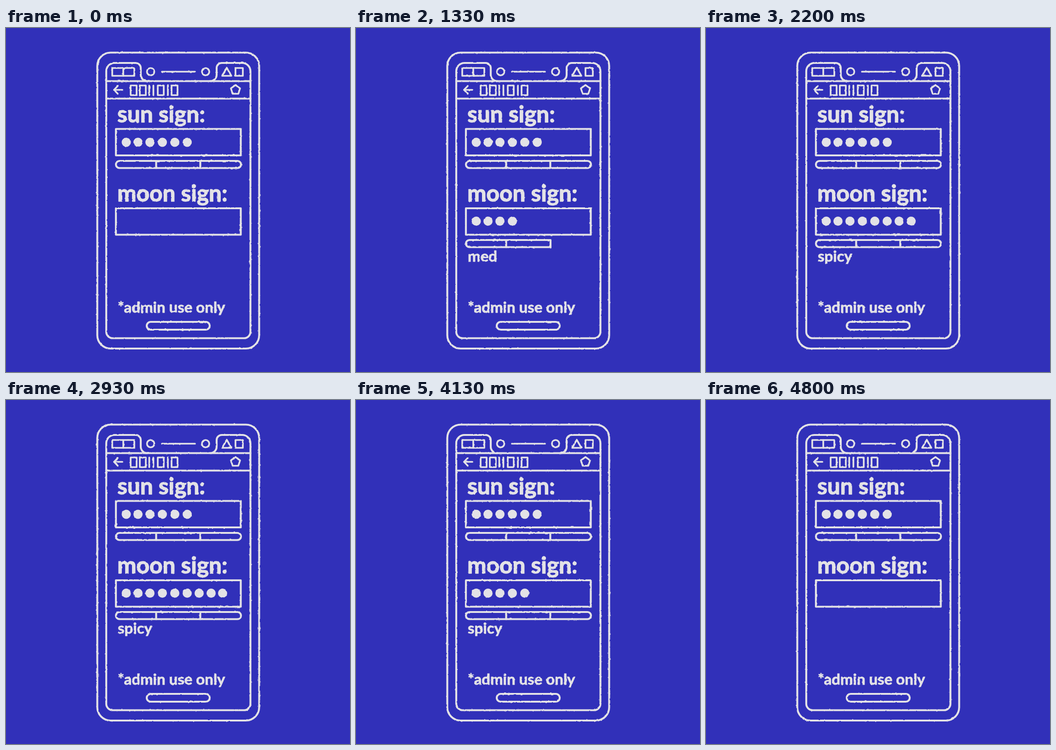
An HTML page with a canvas that plays this animation: 748x748 px, repeating every 5.07 s.

```html
<!DOCTYPE html>
<html lang="en">
<head>
<meta charset="utf-8">
<title>Sign form</title>
<style>
  html, body { margin: 0; width: 100%; height: 100%; overflow: hidden; background: #3130b9; }
  canvas { display: block; width: 748px; height: 748px; filter: url(#rough); }
  svg { position: absolute; width: 0; height: 0; }
</style>
</head>
<body>
<canvas id="stage" width="748" height="748"></canvas>
<svg aria-hidden="true">
  <filter id="rough" x="0" y="0" width="100%" height="100%" color-interpolation-filters="sRGB">
    <feTurbulence id="noise" type="fractalNoise" baseFrequency="0.18" numOctaves="1" seed="1" result="grain"/>
    <feDisplacementMap in="SourceGraphic" in2="grain" scale="2.6" xChannelSelector="R" yChannelSelector="G"/>
  </filter>
</svg>
<script>
const ctx = document.getElementById('stage').getContext('2d');
const noise = document.getElementById('noise');
const INK = '#e3e2e6';
const LOOP = 5070, FPS = 15, BOIL_TICKS = 4;
const TYPE_TICKS = [5, 8, 12, 20, 23, 26, 29, 33, 37];
const ERASE_START = 56, ERASE_STEP = 2;
const DOT_X = [261.5, 287, 313, 340, 367, 394, 420, 446, 471];
const LEVELS = [
  { label: 'mild', right: 327 },
  { label: 'med', right: 423 },
  { label: 'spicy', right: 511 }
];

function path(build) {
  ctx.beginPath();
  build();
  ctx.stroke();
}

function line(...points) {
  path(() => {
    for (let i = 0; i < points.length; i += 2) ctx.lineTo(points[i], points[i + 1]);
  });
}

function box(left, top, right, bottom, radius = 0) {
  path(() => ctx.roundRect(left, top, right - left, bottom - top, radius));
}

function ring(x, y, r) {
  path(() => ctx.arc(x, y, r, 0, Math.PI * 2));
}

function polygon(x, y, r, sides) {
  path(() => {
    for (let i = 0; i < sides; i++) {
      const a = i / sides * Math.PI * 2 - Math.PI / 2;
      ctx.lineTo(x + r * Math.cos(a), y + r * Math.sin(a));
    }
    ctx.closePath();
  });
}

function text(words, x, y, size) {
  ctx.font = `700 ${size}px Lato, sans-serif`;
  ctx.lineWidth = size / 36;
  ctx.fillText(words, x, y);
  ctx.strokeText(words, x, y);
}

function dots(count, y) {
  for (const x of DOT_X.slice(0, count)) {
    ctx.beginPath();
    ctx.arc(x, y, 10, 0, Math.PI * 2);
    ctx.fill();
  }
}

function meter(level, top) {
  const { right } = LEVELS[level];
  const end = level === 2 ? 8 : 0;
  box(239, top, right, top + 15.5, [8, end, end, 8]);
  for (let i = 0; i < level; i++) {
    const x = LEVELS[i].right - 0.5;
    line(x, top, x, top + 15.5);
  }
}

function drawPhone() {
  box(198.5, 53.5, 550.5, 697, 29);
  path(() => {
    ctx.moveTo(308, 115.5);
    ctx.arcTo(293, 115.5, 293, 90, 14);
    ctx.arcTo(293, 76, 250, 76, 11);
    ctx.arcTo(218, 76, 218, 110, 18);
    ctx.arcTo(218, 674.5, 250, 674.5, 14);
    ctx.arcTo(531.5, 674.5, 531.5, 650, 14);
    ctx.arcTo(531.5, 76, 500, 76, 18);
    ctx.arcTo(458, 76, 458, 100, 11);
    ctx.arcTo(458, 115.5, 440, 115.5, 14);
  });
  line(218, 115.5, 531.5, 115.5);
  line(218, 153.5, 531.5, 153.5);
  box(306, 639, 443, 656, 8.5);
}

function drawStatus() {
  box(231, 87, 279, 104);
  line(255, 87, 255, 104);
  ring(314.5, 95, 8);
  line(339, 95, 411, 95);
  ring(434, 95, 8);
  line(480, 86.5, 470, 104, 490, 104, 480, 86.5);
  box(499, 87, 515, 104);
}

function drawToolbar() {
  line(235, 134.5, 253, 134.5);
  line(243, 126, 235, 134.5, 243, 143);
  for (const x of [271, 291, 330, 360]) box(x, 125, x + 13, 146);
  for (const x of [311.5, 320.5, 352]) line(x, 125, x, 146);
  polygon(499, 134.5, 10.5, 5);
}

function drawForm(count) {
  box(239, 219.5, 510.5, 277);
  dots(6, 248.5);
  meter(2, 289);
  box(239, 392, 510.5, 449.5);
  dots(count, 420);
  const level = count < 3 ? 0 : count < 5 ? 1 : 2;
  if (count > 0) meter(level, 461);

  text('sun sign:', 242, 205, 49.6);
  text('moon sign:', 242, 377, 49.6);
  if (count > 0) text(LEVELS[level].label, 243, 508, 33);
  text('*admin use only', 243, 619, 33);
}

function dotCount(tick) {
  const typed = TYPE_TICKS.filter(t => t <= tick).length;
  const erased = Math.max(0, Math.floor((tick - ERASE_START) / ERASE_STEP) + 1);
  return Math.max(0, typed - erased);
}

let shownTick = -1;

function frame(now) {
  // A small lead keeps steps on their rounded hundredths of a second.
  const tick = Math.floor((now % LOOP) / 1000 * FPS + 0.06);
  if (tick !== shownTick) {
    shownTick = tick;
    noise.setAttribute('seed', 1 + Math.floor(tick / BOIL_TICKS) % 19);
    ctx.fillStyle = '#3130b9';
    ctx.fillRect(0, 0, 748, 748);
    ctx.strokeStyle = ctx.fillStyle = INK;
    ctx.lineCap = ctx.lineJoin = 'round';
    ctx.lineWidth = 4.2;
    drawPhone();
    ctx.lineWidth = 3.7;
    drawStatus();
    drawToolbar();
    ctx.lineWidth = 4.2;
    drawForm(dotCount(tick));
  }
  requestAnimationFrame(frame);
}

requestAnimationFrame(frame);
</script>
</body>
</html>
```
